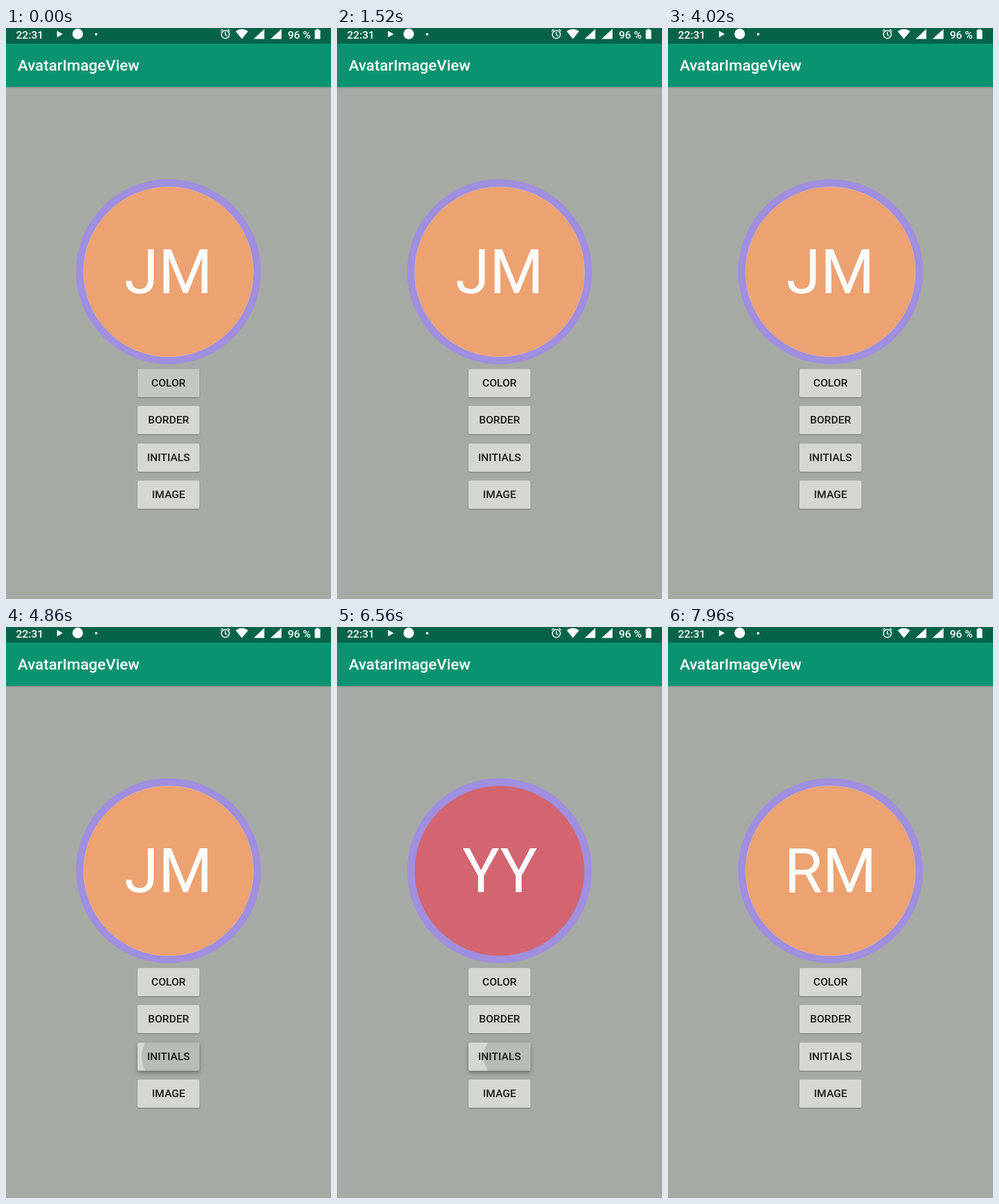
An HTML page for the animation above (8 s loop, 519 by 911 pixels).

```html
<!DOCTYPE html>
<html lang="en">
<head>
<meta charset="utf-8">
<title>AvatarImageView</title>
<style>
  html, body { margin: 0; width: 100%; height: 100%; overflow: hidden; }
  body { position: relative; background: #a6aaa4; font-family: Roboto, "Noto Sans", sans-serif; }
  svg { position: absolute; left: 0; top: 0; }
  .bar { position: absolute; left: 0; top: 25px; width: 519px; height: 68.5px; background: #0a9370; box-shadow: 0 1px 2px rgba(0, 0, 0, .22); }
  .status { font-size: 17.3px; font-weight: 500; }
  .title { font-size: 24.7px; font-weight: 500; }
  .initials { font-size: 98.9px; text-anchor: middle; }
  .button { position: absolute; left: 210px; width: 99px; height: 45px; border-radius: 2.5px; background: #d5d7d2; box-shadow: 0 1px 2px rgba(0, 0, 0, .32); }
  .ripple { position: absolute; inset: 0; border-radius: 2.5px; background: #b6bdb6; opacity: 0; }
  .label { position: absolute; inset: 0; text-align: center; font-size: 17.3px; font-weight: 500; line-height: 45.5px; color: #1c1e1b; }
</style>
</head>
<body>
<div class="bar"></div>
<svg width="519" height="911" viewBox="0 0 519 911" fill="#fff">
  <rect width="519" height="25" fill="#066349"/>
  <text class="status" x="16" y="16.5">22:31</text>
  <path d="M81.5 4.5L90.5 9.8L81.5 15Z"/>
  <circle cx="114.5" cy="9.5" r="8.4"/>
  <circle cx="144" cy="10" r="2"/>
  <g fill="none" stroke="#fff" stroke-width="1.6">
    <circle cx="350.3" cy="10.3" r="6.3"/>
    <path d="M350.3 6.3V10.8L353.3 12.6M342.8 5.2L346.4 2.2M357.8 5.2L354.2 2.2"/>
  </g>
  <path d="M366.7 5.2Q376.7 -1.6 386.7 5.2L376.7 17.5Z"/>
  <path d="M412.5 1.5V17.5H395.5ZM440 1.5V17.5H422.5Z"/>
  <text class="status" x="450" y="16.5">96 %</text>
  <path d="M495.5 1.5H499.5V3.2H502V17.5H493V3.2H495.5Z"/>
  <text class="title" x="18.7" y="68">AvatarImageView</text>

  <circle cx="259.5" cy="388.8" r="147.6" fill="#a08edf"/>
  <g id="orange">
    <circle cx="259.5" cy="389" r="135.5" fill="#eda272" stroke="#f3cfa4" stroke-dasharray="1.5 1.5"/>
  </g>
  <circle id="red" cx="259.5" cy="389" r="135.5" fill="#d2656f"/>
  <g class="initials">
    <text id="jm" x="259.5" y="422.5">JM</text>
    <text id="yy" x="260" y="422.5">YY</text>
    <text id="rm" x="259.5" y="422.5">RM</text>
  </g>
</svg>
<script>
  const LOOP = 8000;

  const [color, , initials] = ['COLOR', 'BORDER', 'INITIALS', 'IMAGE'].map((name, i) => {
    const el = document.createElement('div');
    el.className = 'button';
    el.style.top = Math.round(544 + i * 59.4) + 'px';
    el.innerHTML = `<div class="ripple"></div><div class="label">${name}</div>`;
    document.body.append(el);
    return el;
  });

  // each step holds until the next one
  function play(el, steps, style) {
    const frames = steps.map(s => ({ offset: s.ms / LOOP, easing: 'steps(1, end)', ...style(s) }));
    frames.push({ ...frames[frames.length - 1], offset: 1 });
    el.animate(frames, { duration: LOOP, iterations: Infinity });
  }

  // visible between two times
  function show(id, from, to) {
    const steps = [...new Set([0, from, to])].filter(ms => ms < LOOP).sort((a, b) => a - b);
    play(document.getElementById(id), steps.map(ms => ({ ms })),
      ({ ms }) => ({ opacity: +(from < to ? ms >= from && ms < to : ms >= from || ms < to) }));
  }
  const FIRST = 4980, SECOND = 6660;
  show('orange', SECOND, FIRST);
  show('red', FIRST, SECOND);
  show('jm', 0, FIRST);
  show('yy', FIRST, SECOND);
  show('rm', SECOND, LOOP);

  play(color.firstChild, [{ ms: 0, tint: .6 }, { ms: 500, tint: 0 }], s => ({ opacity: s.tint }));

  // ripple spreads in four steps, fills, drops on release, then fades out
  function press(start, spread, full, release, fade, end, count) {
    const steps = [];
    for (let i = 1; i <= 4; i++) {
      steps.push({
        ms: start + (i - 1) * 20,
        reach: spread * (i / 4) ** .7,
        tint: Math.min(1, .7 + i * .1),
        lift: Math.min(1, .25 + i * .25)
      });
    }
    steps.push({ ms: full, reach: 1, tint: 1, lift: 1 });
    steps.push({ ms: release, reach: 1, tint: .6, lift: 0 });
    for (let i = 1; i <= count; i++) {
      const ms = fade + (end - fade) * (i - 1) / (count - 1);
      steps.push({ ms, reach: 1, tint: .6 * (1 - i / count), lift: 0 });
    }
    return steps;
  }
  const steps = [
    { ms: 0, reach: 0, tint: 0, lift: 0 },
    ...press(640, .85, 800, 980, 1100, 1240, 3),
    ...press(2840, .85, 3000, 3160, 3340, 3600, 6),
    ...press(4800, .8, FIRST, 5020, 5300, 5400, 2),
    ...press(6500, .54, SECOND, 6840, 7100, 7380, 7)
  ];
  play(initials.firstChild, steps, ({ reach, tint }) => ({
    opacity: tint,
    clipPath: `circle(${25 + 31 * reach}px at ${85 - 35.5 * reach}px 22.5px)`
  }));
  play(initials, steps, ({ lift }) => ({
    boxShadow: `0 ${1 + 2 * lift}px ${2 + 4 * lift}px rgba(0, 0, 0, ${.32 + .03 * lift})`
  }));
</script>
</body>
</html>
```
